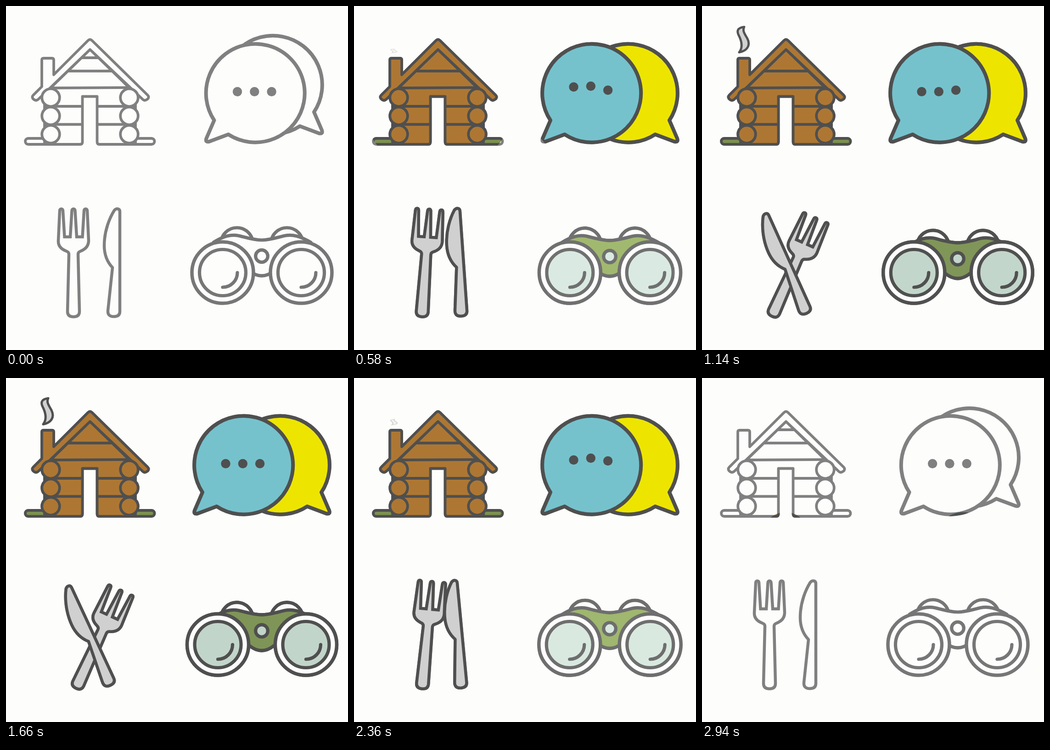
Animation, 745 px wide and 751 px high, one loop 2960 ms. Source, as an HTML page:

```html
<!DOCTYPE html>
<html lang="en">
<head>
<meta charset="utf-8">
<title>Icon set</title>
<style>
  html, body { margin: 0; width: 100%; height: 100%; overflow: hidden; background: #fdfdfc; }
  svg { display: block; width: 100%; height: 100%; }
  .icon { fill: none; stroke-linejoin: round; }
  .round { stroke-linecap: round; }
</style>
</head>
<body>
<svg id="stage" viewBox="0 0 745 751"></svg>
<script>
const PAPER = '#fdfdfc', GREY = '#808080', DARK = '#4f4f4f';
const LOOP = 2960, HALF = 32;
const stage = document.getElementById('stage');

const circle = (x, y, r, extra = '') => `<circle cx="${x}" cy="${y}" r="${r}" ${extra}/>`;
const path = (d, extra = '') => `<path d="${d}" ${extra}/>`;

function cabin({ line, wood, grass, plain }) {
  const logs = [97.5, 268.5].flatMap(x => [200, 240, 280].map(y => circle(x, y, 19.3))).join('');
  return `<g stroke="${line}" stroke-width="5.8" fill="${wood}">
    <g fill="${grass}">
      ${path('M92 289H48.5a6.5 6.5 0 0 0 0 13H92')}
      ${path('M274 289H317a6.5 6.5 0 0 1 0 13H274')}
    </g>
    ${path('M84 178H282V302H203.5Q198.5 302 198.5 297V197.5H166.5V297Q166.5 302 161.5 302H84Z')}
    ${path('M84 219H166.5M84 258.5H166.5M198.5 219H282M198.5 258.5H282')}
    ${path('M183 95L268 178L97 179Z')}
    ${path('M135 142H231' + (plain ? 'M165 113H201' : ''))}
    ${path('M178.5 75.5Q183 71 187.5 75.5L308.5 194.5Q313 199 308 203.5Q302 208 298 204L183 95L70 204Q65 208 60 203.5Q55 199 59.5 194.5L78 176V118Q78 114 82 114H100Q104 114 104 118V150Z')}
    ${logs}
  </g>`;
}

function chat({ line, blue, yellow }) {
  const bubble = 'M428 249.5A107.5 107.5 0 1 1 459 280.3L417 296Q408 298 411 289Z';
  const dots = [0, 1, 2].map(k => circle(478.5 + 37.3 * k, 187, 10.2, `class="dot${k}"`)).join('');
  return `<g stroke="${line}" stroke-width="8">
    <g class="back">${path(bubble, `fill="${yellow}" transform="matrix(-1 0 0 1 1115 0)"`)}</g>
    <g class="front">${path(bubble, `fill="${blue}"`)}<g fill="${line}" stroke="none">${dots}</g></g>
  </g>`;
}

function cutlery({ line, steel }) {
  return `<g stroke="${line}" stroke-width="6.5" fill="${steel}">
    ${path('M117 447Q117.5 443 120.5 443T124 447L127.5 504H140L143.5 447Q144 443 147 443T150.5 447L154 504H166.5L170 447Q170.5 443 173.5 443T177 447L180 512Q180 528 163 535Q157 537 157 542L160 667Q160 678.5 147 678.5T134 667L137 542Q137 537 131 535Q113 528 114 512Z', 'class="fork" stroke-linejoin="miter"')}
    ${path('M248 449V667Q248 678 235 678Q221 678 222 665L232 571Q214 552 214 523C214 490 226 462 236 446Q240 442 244 443Q248 444 248 449Z', 'class="knife"')}
  </g>`;
}

function binoculars({ body, glass }) {
  const dome = x => circle(x, 519, 35, `fill="${PAPER}"`);
  const lens = (side, x) => `<g class="${side}">
    ${circle(x, 582, 67, `fill="${PAPER}" stroke-width="7.5"`)}
    ${circle(x, 582, 50.5, `class="${glass}"`)}
    ${path(`M${x + 32} 582A32 32 0 0 1 ${x} 614`, 'class="round"')}
  </g>`;
  return `<g class="scope" stroke-width="7.2">
    <g class="bridge">
      ${dome(503)}${dome(612)}
      ${path('M452 516C474 502 490 498 507 501.5C525 506 540 511 557 511S589 506 607 501.5C624 498 640 502 664 516L584 578Q557 600 530 578Z', `class="${body}" fill="${PAPER}"`)}
      ${circle(557, 546, 13.3, `class="${glass}" fill="${PAPER}"`)}
    </g>
    ${lens('left', 472)}${lens('right', 643)}
  </g>`;
}

const blank = { line: GREY, wood: PAPER, grass: PAPER, blue: PAPER, yellow: PAPER, steel: PAPER,
  body: 'plain', glass: 'plain', plain: true };
const painted = { line: DARK, wood: '#ad7733', grass: '#7d9150', blue: '#75c2cd', yellow: '#ede500',
  steel: '#d0d0d0', body: 'body', glass: 'glass' };

// Each icon is painted through a circle that rises and grows; x, y, r hold at step 7.
const icons = [
  { draw: cabin, x: 182, y: 274, r: 92, rise: 11.7, minY: 190, growth: 1.103 },
  { draw: chat, x: 568, y: 260, r: 107, rise: 15, minY: 169, growth: 1.11 },
  { draw: cutlery, x: 191, y: 669, r: 74, rise: 18, minY: 560, growth: 1.115 },
  { draw: binoculars, x: 557, y: 626, r: 72, rise: 7, minY: 580, growth: 1.118 }
];

stage.innerHTML = icons.map((icon, n) =>
  `<clipPath id="reveal${n}">${circle(icon.x, icon.y, 0)}</clipPath>
   <g class="icon">${icon.draw(blank)}</g>
   <g class="icon" clip-path="url(#reveal${n})">${icon.draw(painted)}</g>`).join('') +
  path('M92 44C76 46 75 54 81 65C88 80 88 92 81 101C98 98 107 86 99 70C92 58 88 52 92 44Z',
    `class="smoke" fill="${painted.steel}" stroke="${DARK}" stroke-width="5" stroke-linejoin="round"`);

const masks = icons.map((_, n) => stage.querySelector(`#reveal${n} circle`));

function setAll(name, attribute, value) {
  for (const part of stage.querySelectorAll('.' + name)) part.setAttribute(attribute, value);
}
const move = (name, x, y) => setAll(name, 'transform', `translate(${x} ${y})`);
const mix = (from, to, k) => `rgb(${from.map((v, n) => Math.round(v + (to[n] - v) * k))})`;
const smooth = k => { k = Math.min(1, Math.max(0, k)); return k * k * (3 - 2 * k); };

// Cubic bezier easing (.88, 0, .12, 1)
function ease(x) {
  let low = 0, high = 1, s = 0.5;
  for (let n = 0; n < 24; n++) {
    s = (low + high) / 2;
    const at = 2.64 * s * (1 - s) ** 2 + 0.36 * s * s * (1 - s) + s ** 3;
    if (at < x) low = s; else high = s;
  }
  return s * s * (3 - 2 * s);
}

// Poses are held for 20, 100 and 20 ms in turn.
function poseAt(ms) {
  const rest = ms % 140;
  return 3 * Math.floor(ms / 140) + (rest < 20 ? 0 : rest < 120 ? 1 : 2);
}

function render(ms) {
  const step = HALF - Math.abs(poseAt(ms) - HALF);
  const e = ease(step / HALF);

  icons.forEach((icon, n) => {
    masks[n].setAttribute('cy', Math.max(icon.minY, icon.y - icon.rise * (step - 7)));
    masks[n].setAttribute('r', icon.r * icon.growth ** (step - 7));
  });

  const together = 1 - smooth(step / 6);
  move('front', 25.5 * together, 0);
  move('back', -16 * together, -18 * together);
  [9.7, 13.7, 19].forEach((peak, k) => {
    const near = Math.min(1, Math.abs(step - peak) / 10);
    move('dot' + k, 0, -12 * smooth(Math.cos(near * Math.PI / 2) ** 2));
  });

  setAll('fork', 'transform', `translate(${10.5 * e} 0) rotate(${24.7 * e} 147 667)`);
  setAll('knife', 'transform', `translate(${-13 * e} ${-6 * e}) rotate(${-25 * e} 235 665)`);

  move('left', -10.5 * e, 0);
  move('right', 10.5 * e, 0);
  move('bridge', 0, 6 * e);
  setAll('scope', 'stroke', mix([118, 118, 118], [79, 79, 79], e));
  setAll('body', 'fill', mix([168, 192, 116], [127, 149, 87], e));
  setAll('glass', 'fill', mix([223, 238, 230], [194, 213, 202], e));

  setAll('smoke', 'transform', `translate(83 103) scale(${0.45 + 0.55 * e} ${e}) translate(-83 -103)`);
  setAll('smoke', 'opacity', e < 0.02 ? 0 : e);
}

const start = performance.now();
function tick() {
  render((performance.now() - start) % LOOP);
  requestAnimationFrame(tick);
}
tick();
</script>
</body>
</html>
```
